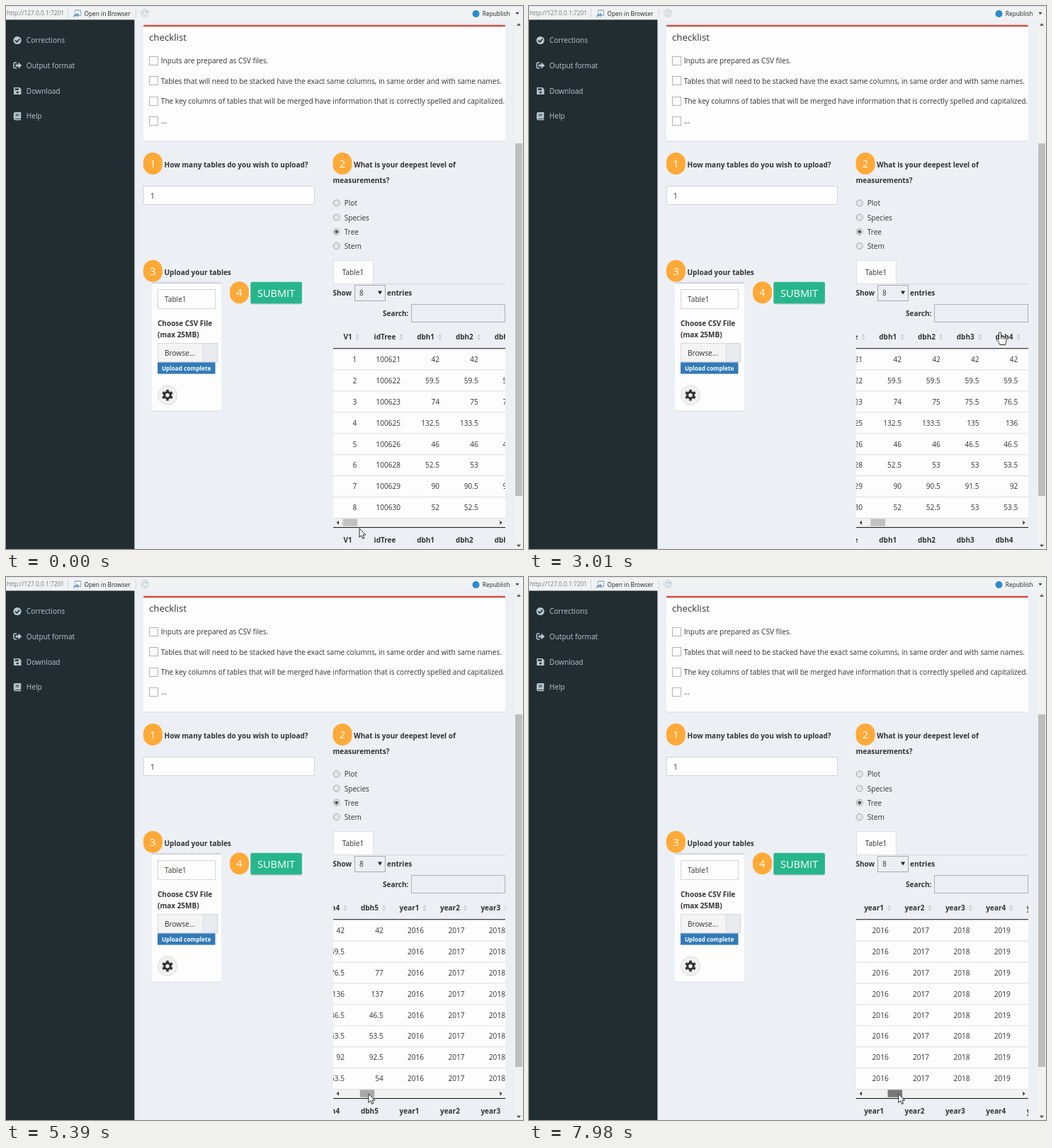
An HTML page for the animation above (8 s loop, 730 px wide and 767 px high).

```html
<!DOCTYPE html>
<html lang="en">
<head>
<meta charset="utf-8">
<title>Table upload</title>
<style>
  html, body { margin: 0; width: 100%; height: 100%; overflow: hidden; background: #ecf0f5; }
  svg { display: block; }
  #stage { width: 730px; height: 767px; }
  text { font: 10.1px "Open Sans", "Noto Sans", sans-serif; fill: #333; white-space: pre; }
  .bold { font-weight: 700; font-size: 10px; }
  .mid { text-anchor: middle; }
  .end { text-anchor: end; }
  .title { font-size: 13.3px; }
  .bar { font-size: 8.35px; fill: #222; }
  .url { fill: #777; }
  .menu { fill: #b8c7ce; }
  .badge { font-size: 14.5px; fill: #fff; text-anchor: middle; }
  .done { font-size: 8.2px; font-weight: 700; fill: #fff; text-anchor: middle; }
</style>
</head>
<body>
<svg id="stage" viewBox="0 0 730 767"></svg>
<script>
const PAPER = "#fdfdfd", PAGE = "#ecf0f5", MENU = "#b8c7ce", DARK = "#222d32", FIELD = "#ebeef3";

const text = (x, y, str, cls = "") => `<text x="${x}" y="${y}" class="${cls}">${str}</text>`;
const rect = (x, y, w, h, fill, more = "") =>
  `<rect x="${x}" y="${y}" width="${w}" height="${h}" fill="${fill}" ${more}/>`;
const box = (x, y, w, h, fill, stroke) => rect(x + .5, y + .5, w - 1, h - 1, fill, `stroke="${stroke}"`);
const path = (d, fill, more = "") => `<path d="${d}" fill="${fill}" ${more}/>`;
const line = (d, stroke, width = 1) => path(d, "none", `stroke="${stroke}" stroke-width="${width}"`);
const circle = (x, y, r, fill, more = "") => `<circle cx="${x}" cy="${y}" r="${r}" fill="${fill}" ${more}/>`;
const badge = (x, y, n) =>
  rect(x - 13.5, y - 15.5, 27, 31, "#ffa938", 'rx="13.5"') + text(x, y + 5.3, n, "badge");
const card = (x, y, w, h, accent) =>
  rect(x, y + 1, w, h, "#d8dce1", 'rx="2"') + rect(x, y, w, h, PAPER, 'rx="2"') +
  rect(x, y, w, 2.5, accent, 'rx="1"');
// Triangle centred on x, y; a negative height points up
const caret = (x, y, w, h, fill) => path(`M${x - w / 2} ${y - h / 2}h${w}l${-w / 2} ${h}z`, fill);
const each = (list, draw) => list.map(draw).join("");

function topBar() {
  return rect(0, 0, 730, 19.4, "#f1f2f4") + rect(0, 0, 730, 1, "#dfe1e4") +
    text(1, 13.4, "http://127.0.0.1:7201", "bar url") +
    rect(87, 4, 1, 13, "#d0d3d6") + rect(183, 4, 1, 13, "#d0d3d6") +
    box(97, 5, 9, 9, "#fff", "#93a9bd") + rect(97, 5, 9, 2, "#a9bfd2") +
    path("M95 16q0-5 5-5v-2l3.5 3.5-3.5 3.5v-2q-3 0-5 2z", "#6fa3d0") +
    text(110.5, 13.6, "Open in Browser", "bar") +
    circle(196, 10, 5.5, "#f6f8fa", 'stroke="#bcc8d2"') +
    line("M198.6 8.4a3 3 0 1 0 .3 2.6M199.2 6.6v2.4h-2.4", "#9fb2c2") +
    circle(663.5, 11, 5, "#2d8bcb") + text(672.8, 14, "Republish", "bar") +
    caret(722, 10.5, 5, 2.8, "#333");
}

function sidebar() {
  return rect(0, 19.4, 181.4, 748, DARK) +
    each(["Corrections", "Output format", "Download", "Help"],
      (label, i) => text(28.8, 52.3 + i * 35.6, label, "menu")) +
    circle(16, 48.5, 5.6, MENU) + line("M13 48.6l2.2 2.2 4-4.2", DARK, 1.6) +
    line("M15 80h-2.6q-1.4 0-1.4 1.4v5q0 1.4 1.4 1.4H15", MENU, 1.5) +
    path("M13.5 82.5h4v-3l4.7 4.5-4.7 4.5v-3h-4z", MENU) +
    path("M11 115h8l2.4 2.4v7.6h-10.4z", MENU) +
    rect(12.6, 116.4, 5.4, 2.4, DARK) + circle(16.2, 122, 1.6, DARK) +
    path("M12.8 150h8.4v8.4h-.8v1.6h.8v1.2h-8.4q-2-.3-2-2.2v-6.8q0-2 2-2.2z", MENU) +
    line("M13.5 153h5M13.5 155h5M12.6 159.3h7", DARK, .9);
}

function checklist() {
  const items = [
    "Inputs are prepared as CSV files.",
    "Tables that will need to be stacked have the exact same columns, in same order and with same names.",
    "The key columns of tables that will be merged have information that is correctly spelled and capitalized.",
    "..."
  ];
  return card(194, 26.8, 511, 163.6, "#d64b3c") + text(202, 49, "checklist", "title") +
    each(items, (item, i) => {
      const y = 77.6 + i * 28.3;
      return box(202, Math.round(y - 6.6), 13, 13, PAPER, "#b4b4b4") + text(218.8, y + 3.8, item);
    });
}

function questions() {
  return badge(207.4, 222.5, 1) + text(223.5, 227.7, "How many tables do you wish to upload?", "bold") +
    box(194, 254, 242, 27, PAPER, "#d2d6de") + text(204, 271.7, "1") +
    badge(475, 222.5, 2) + text(491, 227.7, "What is your deepest level of", "bold") +
    text(461.5, 249.5, "measurements?", "bold") +
    each(["Plot", "Species", "Tree", "Stem"], (level, i) => {
      const y = 278.4 + i * 20.2;
      return circle(466.7, y, 4.5, "#e4e5e7", 'stroke="#9b9b9b" stroke-width=".9"') +
        (level === "Tree" ? circle(466.7, y, 2.4, "#505050") : "") + text(477.7, y + 3.9, level);
    });
}

function upload() {
  const gear = circle(228, 549.7, 4.3, "none", 'stroke="#333" stroke-width="3.2"') +
    circle(228, 549.7, 6.6, "none",
      'stroke="#333" stroke-width="2.6" pathLength="12" stroke-dasharray="1" stroke-dashoffset="-.5"');
  return badge(207.4, 374.2, 3) + text(223.5, 379.8, "Upload your tables", "bold") +
    card(206, 389.8, 98, 182, "#d2d6de") +
    box(214, 400, 82, 28, PAPER, "#d2d6de") + text(224, 417.8, "Table1") +
    text(214, 451.6, "Choose CSV File", "bold") + text(214, 467.8, "(max 25MB)", "bold") +
    box(278, 476, 21, 27, "#e9ebef", "#d2d6de") + box(214, 476, 65, 27, "#f4f4f4", "#d9d9d9") +
    text(224, 493.7, "Browse...") +
    rect(214, 503.4, 81.5, 16.2, "#337ab7") + text(254.6, 514.7, "Upload complete", "done") +
    circle(228, 549.7, 13.6, "#f1f1f1", 'stroke="#dcdcdc"') + gear + badge(329.5, 404.8, 4) +
    rect(345, 391, 73, 30.5, "#b9c9cb", 'rx="2"') + rect(345.5, 389.7, 72.3, 30.6, "#27b68b", 'rx="2"') +
    text(381.6, 410.5, "SUBMIT", "badge");
}

function tableControls() {
  return box(462, 359, 57, 34, PAPER, "#dddfe3") + rect(518, 392, 187, 1, "#d5d8dd") +
    text(490, 379.7, "Table1", "mid") +
    text(461.5, 408.9, "Show", "bold") + box(492, 394, 44, 23, FIELD, "#a9a9a9") +
    text(499, 409, "8") + caret(528, 405, 6, 5, "#222") + text(538, 408.9, "entries", "bold") +
    text(532, 437.8, "Search:", "bold") + box(572, 421, 133, 26, FIELD, "#aeb1b5");
}

function pageScrollbar() {
  return rect(717.6, 19.4, 12.4, 748, "#f1f1f1") + rect(719, 194, 10, 498, "#bebebe") +
    caret(724, 26, 6, -3.5, "#505050") + caret(724, 762.5, 6, 3.5, "#505050");
}

const ROW = 29.93, ROWS_TOP = 484.2, THUMB_RATIO = .0815;

// First diameter and growth until the fifth census; no growth means the last one is missing
const trees = [[42, 0], [59.5, null], [74, 3], [132.5, 4.5], [46, .5], [52.5, 1], [90, 2.5], [52, 2]];
function diameter([first, growth], census) {
  if (growth === null && census === 4) return "";
  return first + Math.round(growth * census / 2) / 2;
}

const columns = [
  { name: "V1", right: 495.3, inset: 12.8, value: (_, r) => r + 1 },
  { name: "idTree", right: 557, inset: 22, value: (_, r) => 100621 + Math.floor(r * 1.4) }
];
for (let i = 0; i < 5; i++) columns.push(
  { name: `dbh${i + 1}`, right: 612 + i * 54.75, inset: 19.4, value: tree => diameter(tree, i) },
  { name: `year${i + 1}`, right: 888.3 + i * 57.4, inset: 20.6, value: () => 2016 + i }
);

function table() {
  const lines = each(trees, (_, r) => rect(462, 513.6 + r * ROW, 243, .9, "#d9d9d9"));
  const cells = each(columns, ({ name, right, inset, value }) =>
    text(right - inset, 471.3, name, "bold mid") + text(right - inset, 757.5, name, "bold mid") +
    caret(right + .8, 465, 5, -4, "#ccd0d5") + caret(right + .8, 470.5, 5, 4, "#ccd0d5") +
    each(trees, (tree, r) => text(right, 502.8 + r * ROW, value(tree, r), "end")));
  return `<svg x="462" y="453" width="243" height="314" viewBox="462 453 243 314">` +
    rect(462, ROWS_TOP, 243, ROW * 8, PAPER) + rect(462, 0, 243, ROW - .6, "#f4f4f4", 'id="hover"') + lines +
    `<g id="cells">${cells}</g>` + rect(462, 483.2, 243, 1.1, "#222") +
    rect(462, 723.8, 243, 12, "#f1f1f1") + rect(0, 724.4, 20.5, 10.4, "#c1c1c1", 'id="thumb"') +
    path("M470 726.7v6l-3.4-3zM697.3 726.7v6l3.4-3z", "#444") +
    rect(462, 736, 243, 1.1, "#222") + "</svg>";
}

function pointer() {
  const ink = 'stroke="#111" stroke-width=".9" stroke-linejoin="round"';
  const arrow = path("M0 0V12.4L2.9 9.8 4.9 14.4 6.9 13.5 5 9H8.8Z", "#fff", ink + ' id="arrow"');
  const hand = path("M-1.5 10V1.2Q-1.5 0 0 0T1.5 1.2V6Q3 5 4.2 6.3 5.8 5.4 6.8 6.8 9 6.3 9 8.5V12" +
    "Q9 14 7.5 17.5H0Q-1 15-4.6 10.5-4.5 8-1.5 10ZM1.5 6v3.5M4.2 6.3v3.2M6.8 6.8v3", "#fff", ink + ' id="hand"');
  return `<g id="pointer">${arrow}${hand}</g>`;
}

document.getElementById("stage").innerHTML = rect(0, 0, 730, 767, PAGE) + topBar() + sidebar() +
  checklist() + questions() + upload() + tableControls() + table() + pageScrollbar() + pointer();
const [cells, hover, thumb, cursor, arrow, hand] =
  ["cells", "hover", "thumb", "pointer", "arrow", "hand"].map(id => document.getElementById(id));

// The screen refreshes once per tick; pointer way points are [tick, x, y]
const TICK = 130.8;
const route = [
  [0, 499, 738], [3, 487.6, 731], [6, 494.6, 731], [8, 494.6, 731], [11, 501, 453], [16, 554, 466],
  [18, 554, 466], [19, 585, 456], [22, 634, 464], [23, 665, 461], [24, 668, 465], [27, 500, 746],
  [30, 494.6, 731], [31, 494.6, 731], [33, 498.5, 730], [41, 511.9, 730], [43, 553, 487],
  [46, 613, 460], [48, 678, 468], [51, 564, 637], [57, 515, 731], [62, 523.4, 730]
];
const drags = [[3, 8], [30, 41], [57, 62]];

function pointerAt(tick) {
  const next = Math.max(1, route.findIndex(([at]) => at >= tick));
  const [t0, x0, y0] = route[next - 1], [t1, x1, y1] = route[next];
  const k = (tick - t0) / (t1 - t0);
  return [x0 + (x1 - x0) * k, y0 + (y1 - y0) * k];
}

// The thumb follows the pointer during each drag
const thumbShift = tick => drags.reduce((shift, [from, to]) =>
  tick > from ? shift + pointerAt(Math.min(tick, to))[0] - pointerAt(from)[0] : shift, 0);

const show = (node, on) => node.setAttribute("visibility", on ? "visible" : "hidden");

function draw() {
  const tick = Math.floor(performance.now() % 8000 / TICK);
  const [x, y] = pointerAt(tick);
  const shift = thumbShift(tick), thumbX = 475.5 + shift;
  const dragging = drags.some(([from, to]) => tick > from && tick < to);
  const overThumb = y > 724 && y < 735 && x > thumbX && x < thumbX + 20.5;
  const row = Math.floor((y - ROWS_TOP) / ROW);
  cells.setAttribute("transform", `translate(${-shift / THUMB_RATIO} 0)`);
  thumb.setAttribute("x", thumbX);
  thumb.setAttribute("fill", dragging ? "#787878" : overThumb ? "#a8a8a8" : "#c1c1c1");
  hover.setAttribute("y", ROWS_TOP + row * ROW);
  show(hover, row >= 0 && row < trees.length);
  cursor.setAttribute("transform", `translate(${x} ${y})`);
  show(hand, y < ROWS_TOP);
  show(arrow, y >= ROWS_TOP);
  requestAnimationFrame(draw);
}
draw();
</script>
</body>
</html>
```
